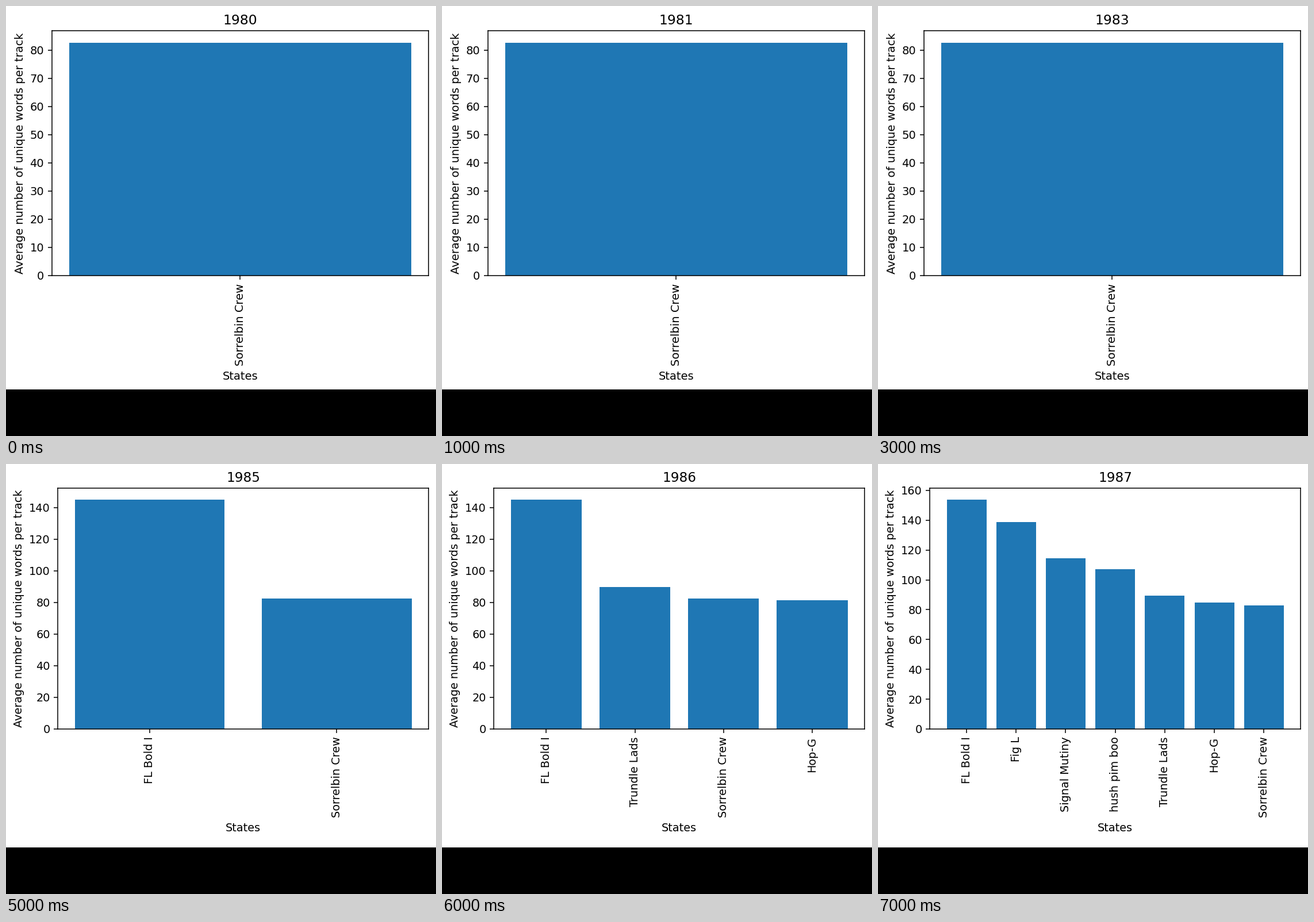
Write a matplotlib script that moves like this. It is 748 px wide and 748 px high and loops after 8000 ms.

```python
import matplotlib.pyplot as plt
from matplotlib.animation import FuncAnimation
from matplotlib.patches import Rectangle
from matplotlib.ticker import MultipleLocator

SIZE = 748
DPI = 100
RIGHT = 735
BAND_TOP = 667

GANG, BOLD, LADS, HOP = "Sorrelbin Crew", "FL Bold I", "Trundle Lads", "Hop-G"
EARLY = {GANG: 82.7}
LATER = {
    1985: {BOLD: 145, GANG: 82.7},
    1986: {BOLD: 145, LADS: 89.8, GANG: 82.7, HOP: 81.6},
    1987: {BOLD: 153.7, "Fig L": 138.9, "Signal Mutiny": 114.6,
           "hush pim boo": 107.2, LADS: 89.3, HOP: 84.7, GANG: 82.7},
}

fig = plt.figure(figsize=(SIZE / DPI, SIZE / DPI), dpi=DPI, facecolor="white")


def set_scale(s):
    """Scale the default text and line sizes by s."""
    rc = {"font.family": "DejaVu Sans", "font.size": 10 * s,
          "axes.linewidth": 0.8 * s, "axes.titlepad": 6 * s,
          "axes.labelpad": 4 * s}
    for axis in ("xtick", "ytick"):
        rc.update({f"{axis}.major.size": 3.5 * s,
                   f"{axis}.major.width": 0.8 * s,
                   f"{axis}.major.pad": 3.5 * s})
    plt.rcParams.update(rc)


def draw(i):
    year = 1980 + i
    data = LATER.get(year, EARLY)
    wide = year < 1985
    left, bottom = (79.8, 469) if wide else (90.3, 461)
    width = RIGHT - left
    unit = width / 4.65  # pixels per inch of a 4.65 x 3.02 inch plot
    height = 3.02 * unit
    set_scale(unit / DPI)

    fig.clear()
    ax = fig.add_axes([left / SIZE, 1 - bottom / SIZE,
                       width / SIZE, height / SIZE])
    ax.bar(list(data), list(data.values()), color="#1f77b4")
    ax.yaxis.set_major_locator(MultipleLocator(10 if wide else 20))
    ax.tick_params(axis="x", rotation=90)
    ax.set_title(str(year))
    ax.set_ylabel("Average number of unique words per track")
    ax.set_xlabel("States")
    ax.xaxis.set_label_coords(0.5, -0.3895)

    fig.add_artist(Rectangle((0, 0), 1, 1 - BAND_TOP / SIZE,
                             color="black", linewidth=0))
    return []


anim = FuncAnimation(fig, draw, frames=8, interval=1000,
                     init_func=lambda: [], repeat=True, repeat_delay=0)
plt.show()
```
